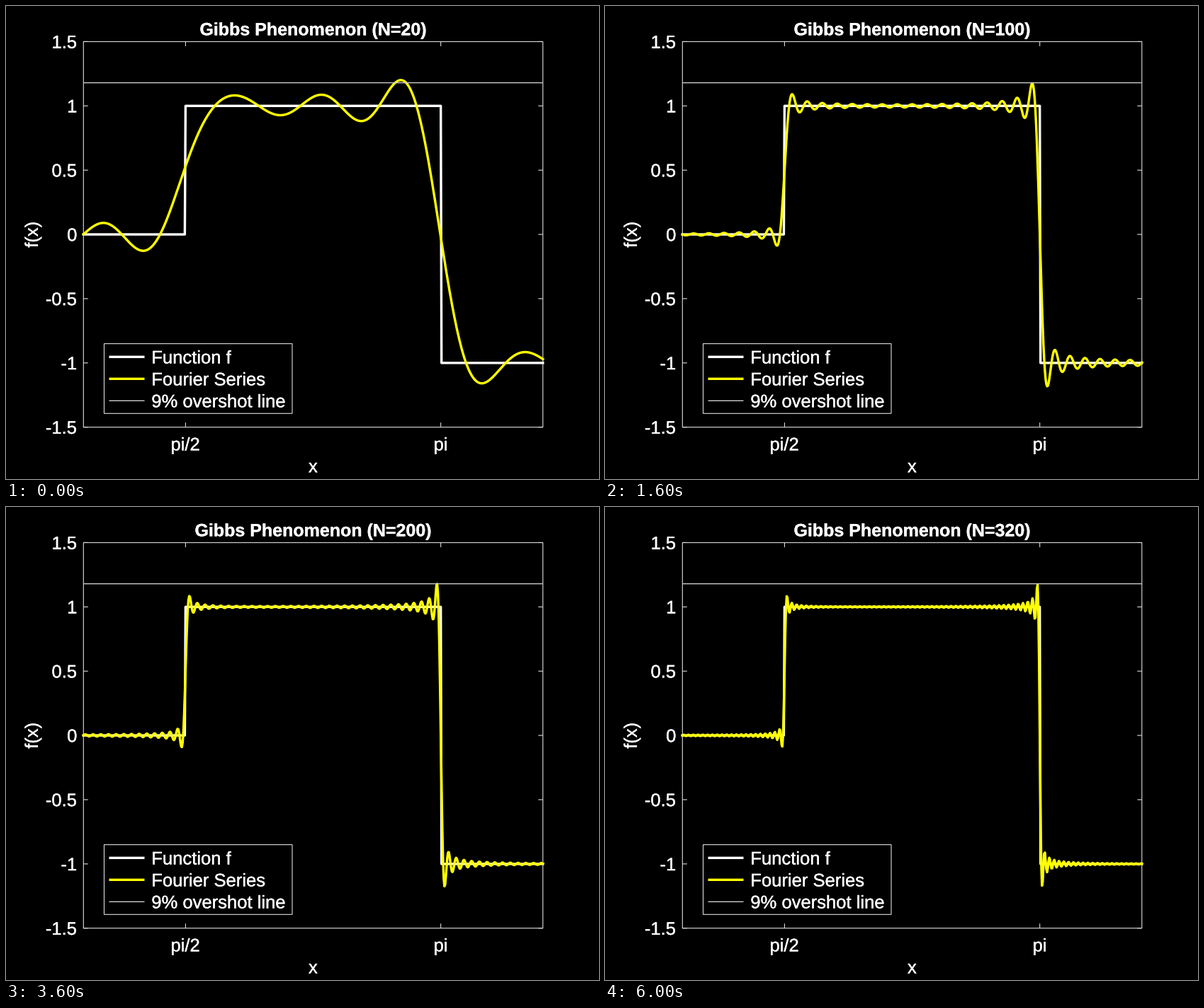
Animation, 837 px wide and 669 px high, one loop 6.4 s. Source, as a matplotlib script:

```python
import numpy as np
import matplotlib
import matplotlib.pyplot as plt
from matplotlib.animation import FuncAnimation
from matplotlib.patches import Rectangle
from matplotlib.patheffects import withStroke

matplotlib.rcParams.update({
    "font.family": "Liberation Sans",
    "text.hinting": "none",
    "text.hinting_factor": 1,
    "toolbar": "None",
})

W, H, DPI = 837, 669, 64
PT = 72 / DPI                                     # points per pixel
LEFT, RIGHT, TOP, BOTTOM = 109.3, 757.8, 50.4, 595.7
X_MIN, X_MAX = 0.3 * np.pi, 1.2 * np.pi
FONT = 25.6
THICK, THIN, GUIDE = 3.4, 1.1, 1.4
FRAME_COLOR, GUIDE_COLOR = "0.88", "0.8"

fig = plt.figure(figsize=(W / DPI, H / DPI), dpi=DPI, facecolor="black")
ax = fig.add_axes([0, 0, 1, 1])
ax.set_xlim(0, W)
ax.set_ylim(H, 0)
ax.axis("off")


def to_px(x):
    return LEFT + (x - X_MIN) / (X_MAX - X_MIN) * (RIGHT - LEFT)


def to_py(y):
    return BOTTOM + (y + 1.5) / 3 * (TOP - BOTTOM)


def line(xs, ys, color, width, z):
    return ax.plot(xs, ys, color=color, lw=width * PT, zorder=z, snap=False,
                   solid_capstyle="projecting" if width > 2 else "butt",
                   solid_joinstyle="round")[0]


def label(x, y, s, ha="center", size=FONT, **kw):
    # A hairline stroke gives the slightly heavier screen weight
    return ax.text(x, y, s, color="white", ha=ha, va="baseline",
                   fontsize=size * PT, zorder=8,
                   path_effects=[withStroke(linewidth=0.3 * PT,
                                            foreground="white")], **kw)


def box(x0, y0, x1, y1, z, face="none"):
    ax.add_patch(Rectangle((x0, y0), x1 - x0, y1 - y0, facecolor=face,
                           edgecolor=FRAME_COLOR, lw=THIN * PT, zorder=z,
                           snap=False))


# Both jumps fall exactly on a sample
x = np.linspace(X_MIN, X_MAX, 631)
px = to_px(x)
EPS = 1e-6
step = np.where(x < np.pi / 2 - EPS, 0, np.where(x <= np.pi + EPS, 1, -1))


def partial_sum(count):
    """Sine series of the odd extension with half period 3*pi/2."""
    n = np.arange(1, count + 1)
    k = 2 * n / 3
    b = 4 / (3 * np.pi) / k * (
        np.cos(k * np.pi / 2) - 2 * np.cos(k * np.pi) + np.cos(n * np.pi))
    return np.sin(np.outer(x, k)) @ b


# Axes frame, ticks and labels
box(LEFT, TOP, RIGHT, BOTTOM, 1)
TICK = 6.5
for v in np.arange(-1.5, 1.6, 0.5):
    y = to_py(v)
    line([LEFT, LEFT + TICK], [y, y], FRAME_COLOR, THIN, 1)
    line([RIGHT - TICK, RIGHT], [y, y], FRAME_COLOR, THIN, 1)
    label(100.6, y + 9.2, f"{v:g}", ha="right")
for v, name in ((np.pi / 2, "pi/2"), (np.pi, "pi")):
    t = to_px(v)
    line([t, t], [TOP, TOP + TICK], FRAME_COLOR, THIN, 1)
    line([t, t], [BOTTOM - TICK, BOTTOM], FRAME_COLOR, THIN, 1)
    label(t, 628.5, name)
label(433.5, 659.5, "x")
label(45, 323, "f(x)", rotation=90, rotation_mode="anchor")

# Curves
line(px, to_py(step), "white", THICK, 2)
series = line(px, to_py(0 * x), "yellow", THICK, 3)
line([LEFT, RIGHT], [to_py(1.18)] * 2, GUIDE_COLOR, GUIDE, 4)

# Legend
box(138.5, 477.6, 404, 576.3, 6, "black")
entries = (("Function f", "white", THICK),
           ("Fourier Series", "yellow", THICK),
           ("9% overshot line", GUIDE_COLOR, GUIDE))
for i, (name, color, width) in enumerate(entries):
    y = 496.3 + 31 * i
    inset = width / 2 if width > 2 else 0
    line([145.5 + inset, 195.5 - inset], [y, y], color, width, 7)
    label(205.3, y + 9.2, name, ha="left")

title = label(433.5, 41.3, "", size=25, weight="bold")


def update(i):
    count = 20 * (i + 1)
    series.set_ydata(to_py(partial_sum(count)))
    title.set_text(f"Gibbs Phenomenon (N={count})")
    return series, title


anim = FuncAnimation(fig, update, frames=16, interval=400, repeat=True,
                     repeat_delay=0, blit=False)
plt.show()
```
